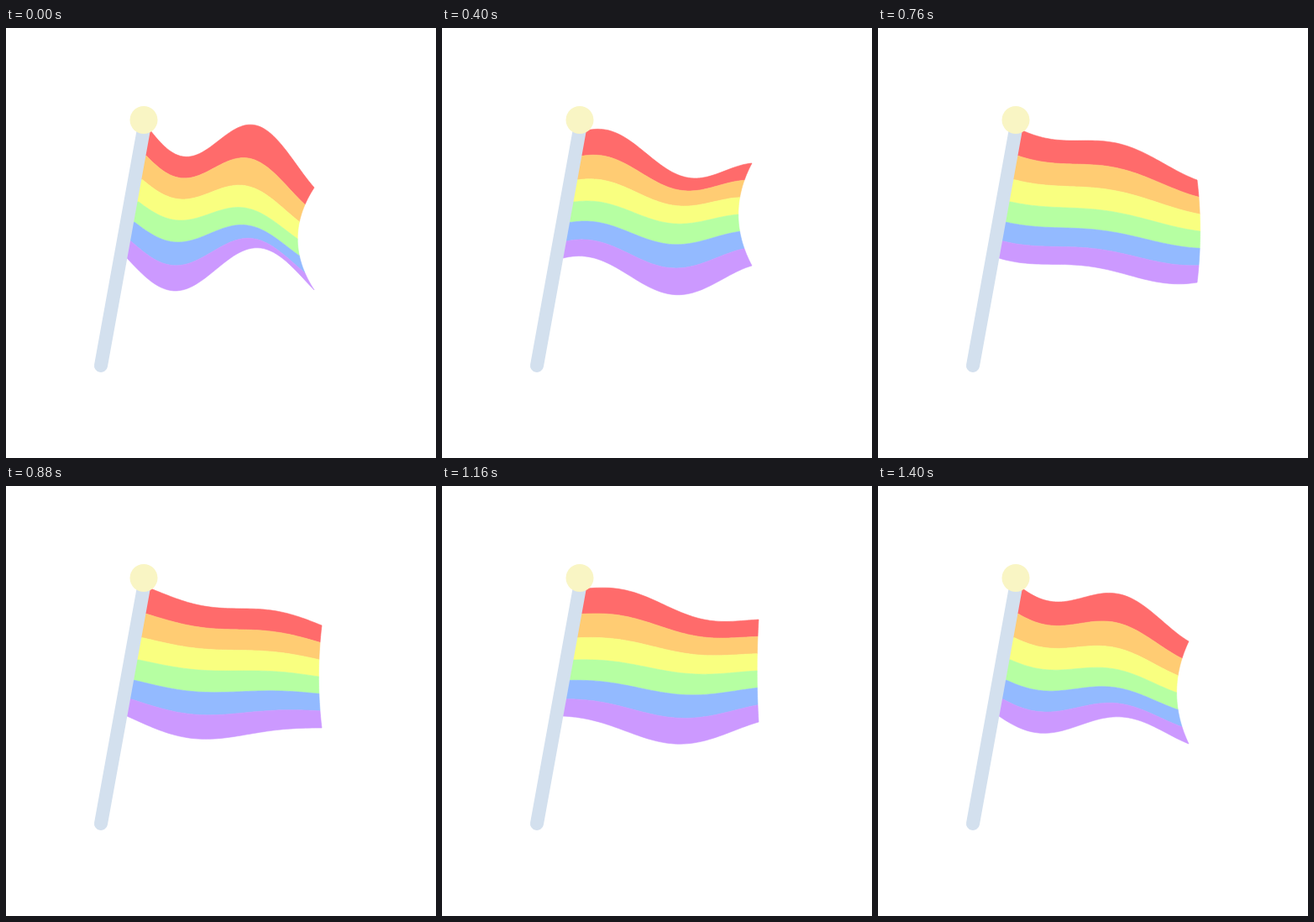
Write an HTML page with a canvas that moves like this. It is 512 px wide and 512 px high and loops after 1480 ms.

```html
<!DOCTYPE html>
<html lang="en">
<head>
<meta charset="utf-8">
<title>Waving flag</title>
<style>
  html, body { margin: 0; width: 100%; height: 100%; overflow: hidden; background: #fff; }
  canvas { display: block; }
</style>
</head>
<body>
<canvas width="512" height="512"></canvas>
<script>
const ctx = document.querySelector('canvas').getContext('2d');
const COLORS = ['#ff6b6b', '#ffcc73', '#f9ff80', '#b6ffa2', '#93baff', '#cc99ff'];
const LOOP = 1480;
const WAVE_NUMBER = 6.6; // radians across the flag, about one full wave

// The pose jumps at these times and holds in between
const STARTS = [0, 160, 280, 400, 520, 640, 760, 880, 1000, 1160, 1280, 1400];

// skew: phase lead of the top over the bottom; tip: height of the upper free corner
const KEYS = [
  { at: 0, phase: 0.2, skew: 0.4, amp: 32, tip: 190, reach: 367 },
  { at: 160, phase: -0.5, skew: 0.6, amp: 21, tip: 178, reach: 368 },
  { at: 400, phase: -2.4, skew: 0, amp: 18, tip: 161, reach: 369 },
  { at: 760, phase: -5, skew: -0.7, amp: 9, tip: 181, reach: 380 },
  { at: 880, phase: -6.6, skew: 0, amp: 6, tip: 166, reach: 376 },
  { at: 1160, phase: -9, skew: -0.5, amp: 8.5, tip: 159, reach: 377 },
  { at: 1400, phase: -12, skew: 0.3, amp: 17, tip: 185, reach: 370 }
];

const mix = (a, b, k) => a + (b - a) * k;
const steps = (count, fn) => Array.from({ length: count + 1 }, (_, n) => fn(n / count));

function poseAt(time) {
  const i = KEYS.findLastIndex(key => key.at <= time);
  const a = KEYS[i], b = KEYS[i + 1] ?? a;
  const k = a === b ? 0 : (time - a.at) / (b.at - a.at);
  return Object.fromEntries(Object.keys(a).map(name => [name, mix(a[name], b[name], k)]));
}

// Point on the cloth: s runs down the pole, u runs from the pole to the free edge
function clothPoint({ phase, skew, amp, tip, reach }, s, u) {
  const bow = 4 * s * (1 - s);
  const edgeX = reach + (reach - 378) * 1.8 * bow;
  const poleY = 122 + 152 * s + 9 * bow;
  const edgeY = tip + 122 * s;

  // Wave pinned at both ends, weaker in the middle stripes
  const p = phase + skew * (0.5 - s);
  const wave = Math.sin(WAVE_NUMBER * u + p) - mix(Math.sin(p), Math.sin(WAVE_NUMBER + p), u);
  const strength = amp * (1 - bow / 2);
  const sag = Math.max(0, 25 - amp) * 0.9 * s ** 3 * Math.sin(Math.PI * u);

  return [mix(172 - 28 * s, edgeX, u), mix(poleY, edgeY, u) + strength * wave + sag];
}

function drawStripe(pose, index) {
  const top = index / COLORS.length, bottom = (index + 1) / COLORS.length;
  const point = (s, u) => clothPoint(pose, s, u);
  const tuck = ([x, y]) => [x - 7, y]; // start behind the pole
  const outline = [
    tuck(point(top, 0)),
    ...steps(60, u => point(top, u)),
    ...steps(6, k => point(mix(top, bottom, k), 1)),
    ...steps(60, u => point(bottom, 1 - u)),
    tuck(point(bottom, 0))
  ];
  ctx.fillStyle = ctx.strokeStyle = COLORS[index];
  ctx.beginPath();
  for (const [x, y] of outline) ctx.lineTo(x, y);
  ctx.closePath();
  ctx.fill();
  ctx.stroke();
}

function drawPole() {
  ctx.strokeStyle = '#d3e0ee';
  ctx.lineWidth = 16;
  ctx.beginPath();
  ctx.moveTo(165, 115);
  ctx.lineTo(113, 402);
  ctx.stroke();
  ctx.fillStyle = '#f9f5c4';
  ctx.beginPath();
  ctx.arc(164, 109.5, 16.5, 0, 2 * Math.PI);
  ctx.fill();
}

function render() {
  const time = performance.now() % LOOP;
  const pose = poseAt(STARTS.findLast(start => start <= time));
  ctx.fillStyle = '#fff';
  ctx.fillRect(0, 0, 512, 512);
  ctx.lineWidth = 0.6;
  ctx.lineCap = ctx.lineJoin = 'round';
  COLORS.forEach((_, index) => drawStripe(pose, index));
  drawPole();
  requestAnimationFrame(render);
}
render();
</script>
</body>
</html>
```
